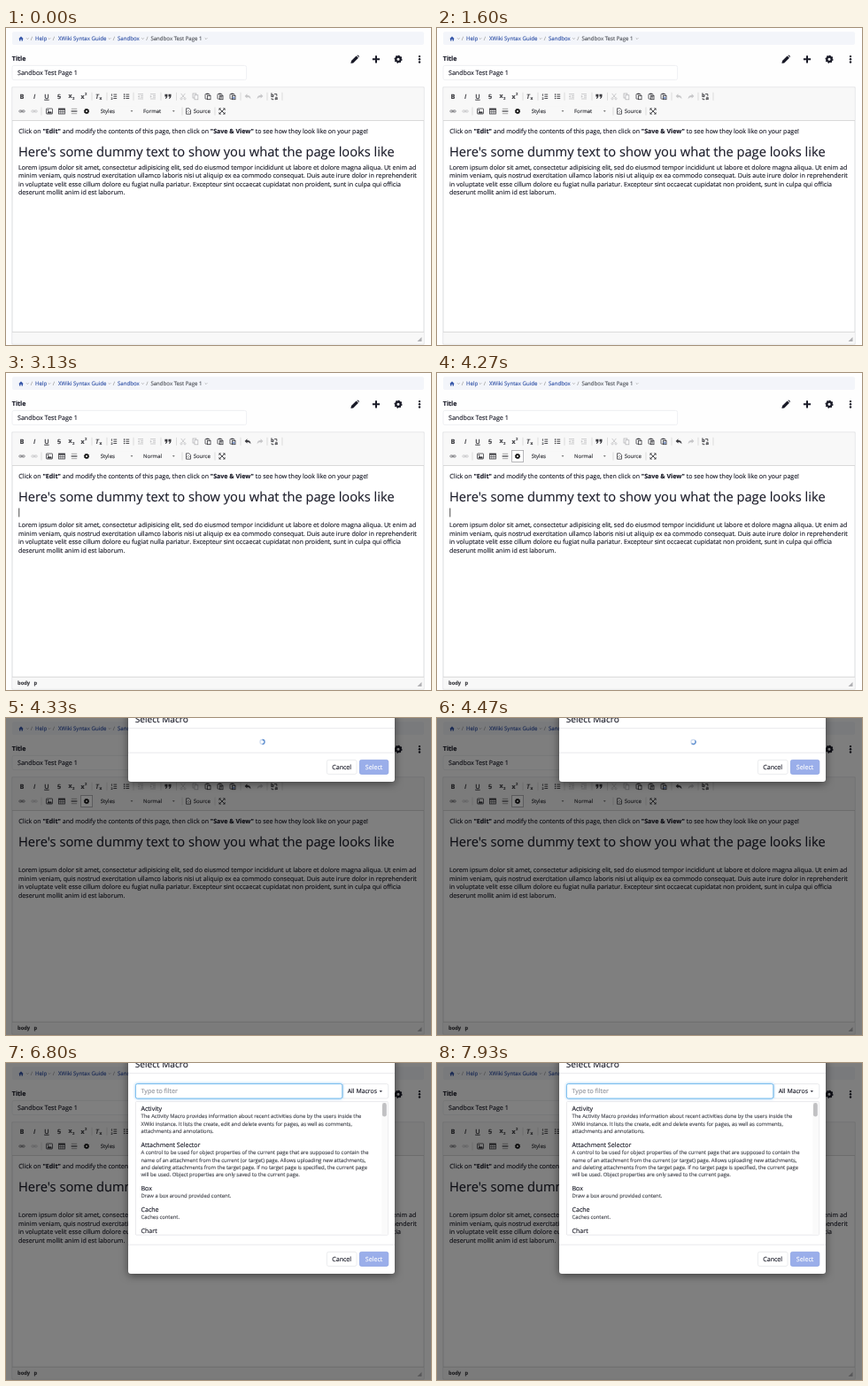
An HTML page for the animation above (8000 ms loop, 480 by 358 pixels).

```html
<!DOCTYPE html>
<html lang="en">
<head>
<meta charset="utf-8">
<title>Wiki editor</title>
<style>
html, body { margin: 0; height: 100%; overflow: hidden; background: #fefefe; }
svg { display: block; width: 100vw; height: 100vh; }
text { font-family: "Open Sans", sans-serif; white-space: pre; text-rendering: geometricPrecision; stroke-width: .14px; }
.b { font-weight: 700; }
#panel { filter: drop-shadow(0 2px 5px rgba(0,0,0,.5)); }
#field { filter: drop-shadow(0 0 1.8px rgba(80,165,235,.75)); }
</style>
</head>
<body>
<svg id="stage" viewBox="0 0 480 358" preserveAspectRatio="none"></svg>
<script>
const LOOP = 8000, CLICK = 1930, ENTER = 2800, PRESS = 4070, OPEN = 4330, LOADED = 5200;
const INK = '#1a1b28', DARK = '#3a3a3f', PALE = '#c6c6c8', BLUE = '#3455a8', LABEL = '#33343a';

const text = (x, y, s, size = 7.08, fill = INK, extra = '') =>
  `<text x="${x}" y="${y}" font-size="${size}" fill="${fill}" stroke="${fill}" ${extra}>${s}</text>`;
const rect = (x, y, w, h, fill, stroke = 'none', r = 0, extra = '') =>
  `<rect x="${x}" y="${y}" width="${w}" height="${h}" rx="${r}" fill="${fill}" stroke="${stroke}" stroke-width=".8" ${extra}/>`;
const line = (d, color = DARK, w = 1, extra = '') =>
  `<path d="${d}" fill="none" stroke="${color}" stroke-width="${w}" ${extra}/>`;
const shape = (d, fill = DARK, extra = '') => `<path d="${d}" fill="${fill}" ${extra}/>`;
const at = (x, y, s, extra = '') => `<g transform="translate(${x} ${y})" ${extra}>${s}</g>`;
const bold = 'class="b"', mid = 'text-anchor="middle"';

const gear = (r, color) =>
  `<circle r="${r * .62}" fill="none" stroke="${color}" stroke-width="${r * .55}"/>` +
  `<circle r="${r * .88}" fill="none" stroke="${color}" stroke-width="${r * .3}" pathLength="16" stroke-dasharray="1 1"/>`;
const down = (color = '#555', s = 1.6) => shape(`M${-s} ${-s / 2}h${2 * s}l${-s} ${s}z`, color);
const bars = (color, indent) => line(`M-3 -2.7h6M${indent} -.9h3M${indent} .9h3M-3 2.7h6`, color, .9);
const board = mark => rect(-3, -2.8, 5, 5.6, 'none', DARK, .5) + rect(-1.7, -3.6, 2.4, 1.5, DARK) +
  rect(-.6, -.8, 3.6, 4.2, '#fff', DARK) + mark;
const arrow = flip => shape('M-3.4 -.4L-.6 -3V-1.4Q3.4 -1.4 3.4 3Q2.2 .7 -.6 .7V2.2Z',
  'currentColor', `transform="scale(${flip} 1)"`);
const seps = (xs, y) => xs.map(x => line(`M${x} ${y - 4.5}v9`, '#d0d0d0', .7)).join('');

function breadcrumb() {
  const items = [[33, 'Help', 49], [59, 'XWiki Syntax Guide', 117], [126, 'Sandbox', 154.5], [163.4, 'Sandbox Test Page 1', 226]];
  let s = rect(7, 4.3, 465, 14.8, '#f3f5fa', 'none', 2);
  s += at(17, 12, shape('M-2.8 .2L0 -2.4L2.8 .2H2V2.4H.6V.7H-.6V2.4H-2V.2Z', BLUE));
  s += line('M23 11.3l1.3 1.3l1.3 -1.3', '#999', .7) + text(27.8, 14, '/', 6, '#999');
  items.forEach(([x, name, c], i) => {
    const last = i == items.length - 1;
    s += text(x, 14, name, 6.1, last ? '#55585f' : BLUE);
    s += line(`M${c - 1.3} 11.3l1.3 1.3l1.3 -1.3`, '#999', .7);
    if (!last) s += text(c + 3.8, 14, '/', 6, '#999');
  });
  return s;
}

function header() {
  return text(6.8, 37, 'Title', 7.05, INK, bold) +
    rect(7, 42.4, 264.6, 16.2, '#fff', '#ebecf0', 2) + text(13, 53, 'Sandbox Test Page 1', 7.1) +
    at(394, 35.3, shape('M-4.6 4.6L-4 1.7L1.6 -3.9L4 -1.5L-1.7 4.1ZM2.3 -4.4Q3.2 -5.2 4 -4.4L4.6 -3.8Q5.3 -3 4.5 -2.2Z', INK)) +
    at(418, 35.3, line('M-4.1 0h8.2M0 -4.1v8.2', INK, 2)) +
    at(443, 35.3, gear(4.4, INK)) +
    [-3.2, 0, 3.2].map(d => `<circle cx="467" cy="${35.3 + d}" r="1.2" fill="${INK}"/>`).join('');
}

function rowOne() {
  const glyph = (x, s, extra) => text(x, 79.9, s, 7.3, DARK, `${mid} ${extra}`);
  const list = mark => line('M-.6 -2.2h3.8M-.6 0h3.8M-.6 2.2h3.8', DARK, .9) + mark;
  return glyph(18, 'B', bold) + glyph(32, 'I', 'font-style="italic" font-weight="600"') +
    glyph(46, 'U', 'text-decoration="underline" font-weight="600"') +
    glyph(60, 'S', 'text-decoration="line-through" font-weight="600"') +
    text(70.6, 79.3, 'x', 7, DARK, bold) + text(75, 81, '2', 4.2, DARK, bold) +
    text(84.6, 79.6, 'x', 7, DARK, bold) + text(89, 76.3, '2', 4.2, DARK, bold) +
    text(101, 80, 'T', 7.4, DARK, 'font-style="italic" font-weight="600"') + text(105.6, 81, 'x', 4.8, DARK, bold) +
    at(122, 77.3, list(text(-3.5, -.8, '1', 3.4, DARK, bold) + text(-3.5, 3.5, '2', 3.4, DARK, bold))) +
    at(136, 77.3, list([-2.2, 0, 2.2].map(y => `<circle cx="-2.4" cy="${y}" r=".8" fill="${DARK}"/>`).join(''))) +
    at(152, 77.3, bars(PALE, 0) + shape('M-1.2 -1.6v3.2l-2 -1.6z', PALE)) +
    at(166, 77.3, bars(PALE, 0) + shape('M-3.2 -1.6v3.2l2 -1.6z', PALE)) +
    at(183, 77.3, [-3.6, .5].map(x => shape(`M${x} -2.6h3v2.4q0 2 -2 3l-.6 -.7q1 -.7 1 -1.8h-1.4z`)).join('')) +
    at(200, 77.3, line('M-2.4 -3.4L1.6 1.5M2.4 -3.4L-1.6 1.5', PALE, .9) +
      [-2, 2].map(x => `<circle cx="${x}" cy="2.5" r="1.1" fill="none" stroke="${PALE}" stroke-width=".8"/>`).join('')) +
    at(214, 77.3, rect(-3, -3.3, 3.8, 5, 'none', '#b4b4b8') + rect(-1, -1.5, 3.8, 5, '#fff', '#b4b4b8')) +
    at(228, 77.3, board('')) +
    at(242, 77.3, board(line('M.1 .4h2.2M1.2 .4v2.2', DARK, .7))) +
    at(256, 77.3, board(line('M-.1 .4l.6 2.1l.7 -1.8l.7 1.8l.5 -2.1', '#3d62a8', .6))) +
    at(273, 77.3, arrow(1), 'id="undo"') + at(287, 77.3, arrow(-1), `color="${PALE}"`) +
    at(303, 77.3, text(-4, .8, 'b', 5.8, DARK, bold) + text(.6, 4, 'a', 5.8, DARK, bold) +
      line('M0 -2.7h2.8v2.2M-2.9 1.9v1.5h2.3', DARK, .9)) +
    seps([97, 114, 144, 175, 192.5, 265, 295, 312], 77.3);
}

function rowTwo() {
  const link = c => rect(-3.3, -1.1, 3.4, 2.2, 'none', c, 1.1) + rect(-.1, -1.1, 3.4, 2.2, 'none', c, 1.1) + line('M-1.8 0h3.6', c, .9);
  const combo = (x, w, label, id) => rect(x, 88.2, w, 11.4, '#f8f8f8') +
    text(x + 1.7, 96, label, 6, LABEL, `id="${id}"`) + at(x + w - 5, 94, down('#555', 1.4));
  return at(18, 94, link('#77777b')) + at(32, 94, link(PALE)) +
    at(49, 94, rect(-3.5, -3, 7, 6, 'none', DARK, .5) + shape('M-2.8 2.4l2 -3l1.4 1.6l1.2 -1l1.2 2.4zM-2.4 -1.2a.8 .8 0 1 1 1.6 0a.8 .8 0 1 1 -1.6 0')) +
    at(63, 94, rect(-3.5, -3, 7, 6, 'none', DARK) + rect(-3.5, -3, 7, 1.6, DARK) + line('M-3.5 .6h7M-1.2 -1.5v4.5M1.2 -1.5v4.5', DARK, .6)) +
    at(77, 94, line('M-3.2 -2.7h6.4M-3.2 2.7h6.4', '#999', .9) + line('M-3.4 0h6.8', DARK, 1.2)) +
    rect(84.6, 87.5, 13, 13, '#fff', '#a6a6aa', 0, 'id="pressed"') +
    at(91, 94, gear(3, '#161616')) +
    combo(105, 42, 'Styles', 'styles') + combo(153.3, 41, 'Format', 'format') +
    at(206, 94, shape('M-2.5 -3.2h3.2l1.8 1.8v4.6h-5z', '#fff', `stroke="${DARK}" stroke-width=".8"`) +
      line('M-.4 -.7l-1 1.1l1 1.1M.4 -.7l1 1.1l-1 1.1', DARK, .6)) +
    text(211.7, 96, 'Source', 6, LABEL) +
    at(244, 94, line('M-3 -3L3 3M3 -3L-3 3', DARK, .9) +
      [0, 90, 180, 270].map(a => shape('M-3.5 -3.5h2.7l-2.7 2.7z', DARK, `transform="rotate(${a})"`)).join('')) +
    seps([40, 199, 236], 94);
}

function editor() {
  const para = [
    'Lorem ipsum dolor sit amet, consectetur adipisicing elit, sed do eiusmod tempor incididunt ut labore et dolore magna aliqua. Ut enim ad',
    'minim veniam, quis nostrud exercitation ullamco laboris nisi ut aliquip ex ea commodo consequat. Duis aute irure dolor in reprehenderit',
    'in voluptate velit esse cillum dolore eu fugiat nulla pariatur. Excepteur sint occaecat cupidatat non proident, sunt in culpa qui officia',
    'deserunt mollit anim id est laborum.'];
  const b = s => `<tspan class="b">${s}</tspan>`;
  return rect(7, 67, 465, 290, '#fff', '#d3d4d7') +
    rect(7.4, 67.4, 464.2, 36.9, '#f8f8f8') + line('M7 104.5h465', '#d1d1d1', .8) +
    rowOne() + rowTwo() +
    text(14.2, 119.3, `Click on ${b('"Edit"')} and modify the contents of this page, then click on ${b('"Save &amp; View"')} to see how they look like on your page!`, 7.05) +
    text(14, 145.3, "Here's some dummy text to show you what the page looks like", 14.67) +
    at(0, 0, para.map((s, i) => text(14, 159.6 + i * 9.55, s)).join(''), 'id="para"') +
    rect(14.4, 152.6, .8, 10, '#222', 'none', 0, 'id="caret"') +
    rect(7.4, 343.4, 464.2, 13.2, '#f8f8f8') + line('M7 343.3h465', '#d1d1d1', .8) +
    at(0, 0, text(13, 352, 'body', 5.75, DARK, bold) + text(31.4, 352, 'p', 5.75, DARK, bold), 'id="path"') +
    shape('M469.5 349v5h-5z', '#b0b0b3');
}

function macroList() {
  const macros = [
    [53.5, 'Activity', 'The Activity Macro provides information about recent activities done by the users inside the',
      'XWiki instance. It lists the create, edit and delete events for pages, as well as comments,', 'attachments and annotations.'],
    [94.5, 'Attachment Selector', 'A control to be used for object properties of the current page that are supposed to contain the',
      'name of an attachment from the current (or target) page. Allows uploading new attachments,',
      'and deleting attachments from the target page. If no target page is specified, the current page',
      'will be used. Object properties are only saved to the current page.'],
    [143.7, 'Box', 'Draw a box around provided content.'],
    [167.7, 'Cache', 'Caches content.'],
    [191.8, 'Chart']];
  const rows = macros.map(([y, name, ...about]) => text(152.5, y, name) +
    about.map((s, i) => text(152.5, y + 8.6 + i * 8.4, s, 5.87, '#45474f')).join('')).join('');
  return rect(380, 23.6, 51.8, 16.4, '#fff', '#e3e4e8', 2) +
    text(385.7, 34, 'All Macros', 6.95) + at(423.3, 32.2, down(INK, 1.7)) +
    rect(146.4, 23.6, 233.4, 16.4, '#fff', '#5fb0ea', 2, 'id="field"') +
    text(152.6, 34.2, 'Type to filter', 7.05, '#8f929a') +
    rect(152.7, 27.4, .7, 9, '#222', 'none', 0, 'id="cursor"') +
    rect(146.4, 43.6, 285.2, 150.6, '#fff', '#e2e3e7', 1) + rows +
    rect(424.2, 44, 7, 149.8, '#fafafa') + rect(425, 45, 4.8, 15.6, '#c1c1c3', 'none', 2.4);
}

function modal() {
  return rect(0, 0, 480, 358, '#000', 'none', 0, 'opacity=".5"') +
    rect(138, -10, 301, 82, '#fff', 'none', 3, 'id="panel"') +
    text(145.8, 5, 'Select Macro', 10.1) + line('M138 11.6h301', '#e5e5e8', .8) +
    at(289.5, 27, '<circle r="2.5" fill="none" stroke="#cfdcf0" stroke-width="1.3"/>' +
      '<path id="spin" d="M0 -2.5A2.5 2.5 0 0 1 0 2.5" fill="none" stroke="#5f8fcf" stroke-width="1.3"/>', 'id="loader"') +
    at(0, 0, macroList(), 'id="list"') +
    at(0, 0, line('M138 39.2h301', '#e5e5e8', .8) +
      rect(362.4, 47.4, 33.6, 16, '#fff', '#e6e7ea', 2) + text(379.2, 57.8, 'Cancel', 7.08, INK, mid) +
      rect(399.4, 47.4, 32.4, 16, '#9aaeea', '#8ba1e2', 2) + text(415.6, 57.8, 'Select', 7.08, '#fff', mid), 'id="foot"');
}

document.getElementById('stage').innerHTML =
  rect(0, 0, 480, 358, '#fefefe') + breadcrumb() + header() + editor() + at(0, 0, modal(), 'id="modal"');

const el = {};
document.querySelectorAll('[id]').forEach(e => el[e.id] = e);
const show = (id, on) => el[id].setAttribute('visibility', on ? 'inherit' : 'hidden');
const shift = (id, y) => el[id].setAttribute('transform', `translate(0 ${y})`);
const blink = age => age >= 0 && age % 1000 < 500;

function render(t) {
  const typing = t >= CLICK, split = t >= ENTER, open = t >= OPEN, loaded = t >= LOADED;
  el.format.textContent = typing ? 'Normal' : 'Format';
  show('path', typing);
  shift('para', split ? 14.7 : 0);
  el.undo.setAttribute('color', split ? DARK : PALE);
  show('caret', !open && blink(t - (split ? ENTER : CLICK)));
  show('pressed', t >= PRESS && !loaded);

  el.modal.setAttribute('visibility', open ? 'visible' : 'hidden');
  show('loader', !loaded);
  el.spin.setAttribute('transform', `rotate(${(t - OPEN) * .36})`);
  show('list', loaded);
  show('cursor', loaded && blink(t - LOADED));
  el.panel.setAttribute('height', loaded ? 248 : 82);
  shift('foot', loaded ? 166 : 0);
}

const start = performance.now();
function tick() {
  render((performance.now() - start) % LOOP);
  requestAnimationFrame(tick);
}
tick();
</script>
</body>
</html>
```
